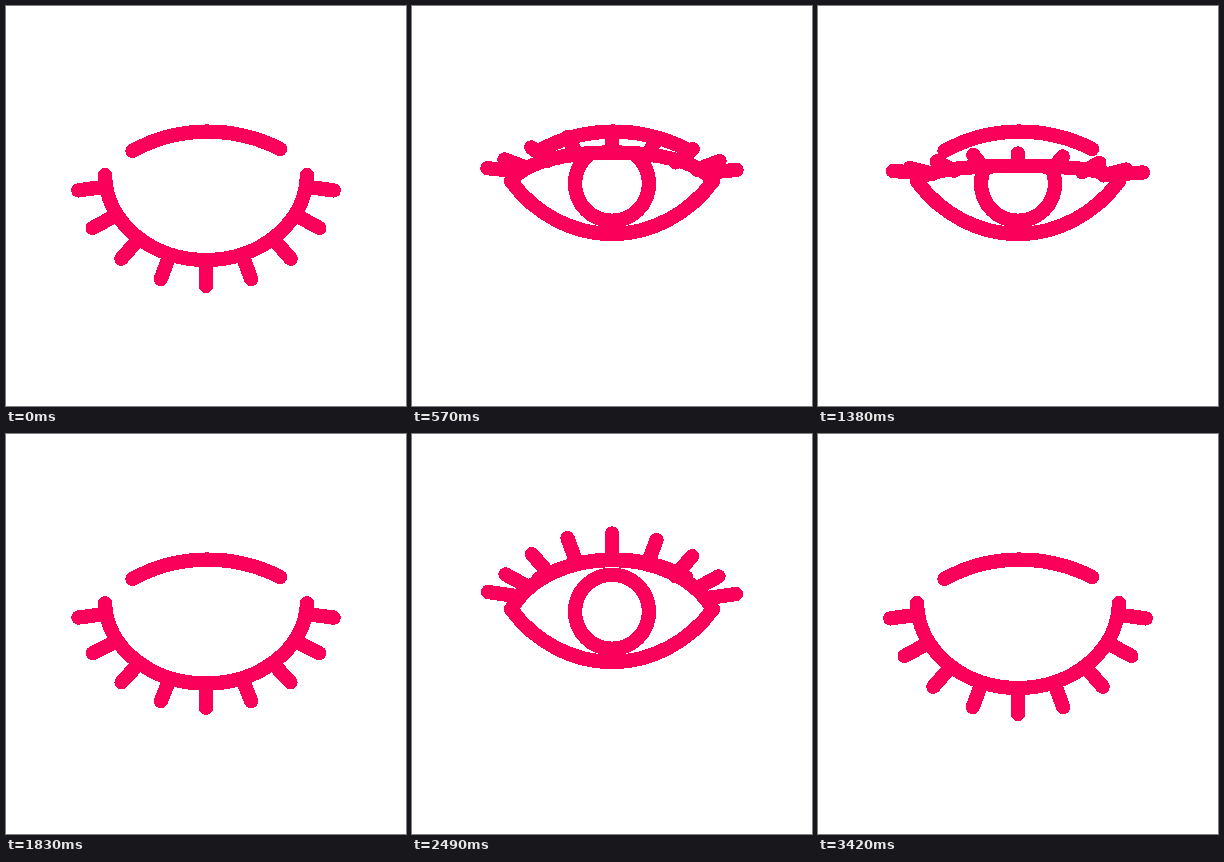
An HTML page that plays this animation: 400 px wide and 400 px high, repeating every 5450 ms.

```html
<!DOCTYPE html>
<html lang="en">
<head>
<meta charset="utf-8">
<title>Blinking eye</title>
<style>
  html, body { margin: 0; width: 100%; height: 100%; overflow: hidden; background: #fff; }
  svg { display: block; width: 100vw; height: 100vh; }
  .line { fill: none; stroke: #fb005a; stroke-width: 14.3; stroke-linecap: round; stroke-linejoin: round; }
</style>
</head>
<body>
<svg viewBox="0 0 400 400" shape-rendering="crispEdges">
  <path class="line" d="M99 175C122 207 160 228 200 228S278 207 301 175"/>
  <circle class="line" cx="200" cy="177.7" r="37"/>
  <path id="cover" fill="#fff"/>
  <path class="line" d="M126.5 145C172 119.5 228 119.5 274 143"/>
  <path class="line" id="lid"/>
  <path class="line" id="lashes"/>
</svg>
<script>
const LOOP = 5450, STEP = 30, LAST = 114;
const CENTER = 200, LASH_LENGTH = 26, LASH_ANGLE = 20.5 * Math.PI / 180;

// The lid opens and closes in turn; bias above 1 starts slower, below 1 faster
const MOVES = [
  { start: 0, end: 27, bias: .83 },
  { start: 35, end: 58, bias: 1.47 },
  { start: 58, end: 80, bias: 1.1 },
  { start: 91, end: 114, bias: 1 }
];

const $ = id => document.getElementById(id);
const mix = (a, b, p) => a + (b - a) * p;
const smooth = x => x * x * (3 - 2 * x);

function openness(step) {
  let turn = MOVES.length - 1;
  while (turn > 0 && step < MOVES[turn].start) turn--;
  const { start, end, bias } = MOVES[turn];
  const moved = smooth(Math.min(1, (step - start) / (end - start)) ** bias);
  return turn % 2 ? 1 - moved : moved;
}

// A half ellipse when closed, a shallow pointed arch when open
function lidPath(p) {
  const endX = 99, endY = mix(169, 175.5, p), top = mix(254, 126, p);
  const sideX = mix(100, 118, p), sideY = mix(216, 143.5, p);
  return `M${endX} ${endY}C${sideX} ${sideY} ${mix(144.5, 157, p)} ${top} ${CENTER} ${top}` +
    `S${2 * CENTER - sideX} ${sideY} ${2 * CENTER - endX} ${endY}`;
}

// Closed lashes fan out around an ellipse, open ones along a curve above the lid
function lashPath(index, p) {
  const i = Math.abs(index), side = Math.sign(index);
  const sin = Math.sin(i * LASH_ANGLE), cos = Math.cos(i * LASH_ANGLE);
  const openX = i * (49 - 4.5 * i);
  const x = mix(129 * sin, openX, p);
  const y = mix(169 + 111 * cos, 99.5 + 59.5 * (openX / 124) ** 2.3 + side, p);
  const baseX = x - LASH_LENGTH * sin;
  const baseY = y - LASH_LENGTH * cos * (1 - 2 * p);
  return `M${CENTER + side * baseX} ${baseY}L${CENTER + side * x} ${y}`;
}

function draw(p) {
  const lid = lidPath(p);
  $('lid').setAttribute('d', lid);
  $('cover').setAttribute('d', `${lid}V80H99Z`);
  let lashes = '';
  for (let i = -4; i <= 4; i++) lashes += lashPath(i, p);
  $('lashes').setAttribute('d', lashes);
}

const begin = performance.now();
function tick() {
  const time = (performance.now() - begin) % LOOP;
  draw(openness(Math.min(LAST, Math.floor(time / STEP))));
  requestAnimationFrame(tick);
}
tick();
</script>
</body>
</html>
```
